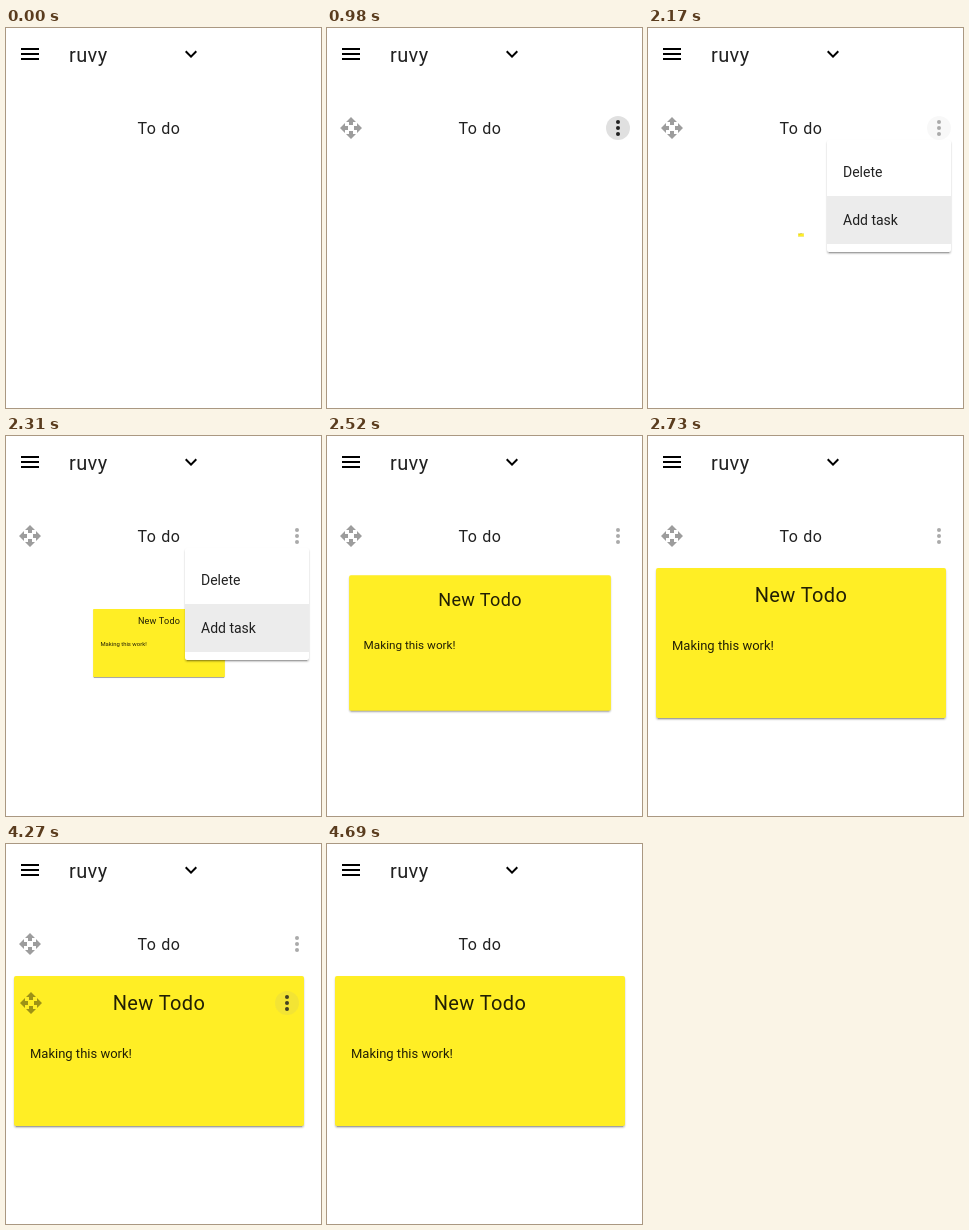
These frames come from a looping animation (315 px wide and 380 px high, 5950 ms). An HTML page:

```html
<!DOCTYPE html>
<html lang="en">
<head>
<meta charset="utf-8">
<title>Task board</title>
<style>
  html, body { margin: 0; width: 100%; height: 100%; overflow: hidden; background: #fff; }
  body { position: relative; font-family: Roboto, Arial, sans-serif; color: rgba(0,0,0,.87); }
  div, svg { position: absolute; }
  svg { width: 24px; height: 24px; }
  .title { font-size: 20px; line-height: 24px; letter-spacing: .02em; white-space: nowrap; }
  .center { left: 0; width: 100%; text-align: center; }
  .button { width: 24px; height: 24px; border-radius: 50%; }
  .raised { box-shadow: 0 2px 2px rgba(0,0,0,.14), 0 3px 1px -2px rgba(0,0,0,.2), 0 1px 2px rgba(0,0,0,.12); border-radius: 2px; }
  #listName { left: 8px; top: 91px; width: 290px; text-align: center; font-size: 16px; line-height: 19px; letter-spacing: .04em; }
  #card { left: 8px; top: 132px; width: 290px; height: 150px; background: #ffee25; }
  #note { left: 16px; top: 70px; font-size: 13px; line-height: 15px; white-space: nowrap; }
  #menu { left: 179px; top: 112px; width: 124px; height: 112px; }
  #sheet, #items { width: 100%; height: 100%; }
  #sheet { background: #fff; transform-origin: 100% 0; }
  .item { width: 108px; height: 32px; padding: 16px 0 0 16px; height: 32px; font-size: 14px; line-height: 16px; }
</style>
</head>
<body>
<svg style="left:12px;top:14px"><path d="M3 18h18v-2H3zM3 13h18v-2H3zM3 6v2h18V6z"/></svg>
<div class="title" style="left:63px;top:15px">ruvy</div>
<svg style="left:173px;top:14px"><path d="M16.59 8.59L12 13.17 7.41 8.59 6 10l6 6 6-6z"/></svg>

<svg id="listMove" style="left:12px;top:88px"><path id="arrows" d="M10 9h4V6h3l-5-5-5 5h3zM9 10H6V7l-5 5 5 5v-3h3zM23 12l-5-5v3h-3v4h3v3zM14 15h-4v3H7l5 5 5-5h-3z"/></svg>
<div id="listName">To do</div>
<div id="listMore" class="button" style="left:279px;top:88px">
  <svg><g id="dots" fill="#222"><circle cx="12" cy="6" r="2"/><circle cx="12" cy="12" r="2"/><circle cx="12" cy="18" r="2"/></g></svg>
</div>

<div id="card" class="raised">
  <svg id="cardMove" style="left:5px;top:15px"><use href="#arrows"/></svg>
  <div class="title center" style="top:15px">New Todo</div>
  <div id="cardMore" class="button" style="left:261px;top:15px"><svg><use href="#dots"/></svg></div>
  <div id="note">Making this work!</div>
</div>

<div id="menu">
  <div id="sheet" class="raised"></div>
  <div id="items">
    <div id="del" class="item" style="top:8px">Delete</div>
    <div id="add" class="item" style="top:56px">Add task</div>
  </div>
</div>

<script>
const LOOP = 5950, STEP = 70, DIM = .38;
const el = {};
document.querySelectorAll('[id]').forEach(e => el[e.id] = e.style);

const ramp = (t, from, to) => Math.min(1, Math.max(0, (t - from) / (to - from)));

// Linear interpolation through [time, value, time, value, ...]
function track(t, ...keys) {
  let v = keys[1];
  for (let i = 2; i < keys.length; i += 2)
    v += (keys[i + 1] - keys[i - 1]) * ramp(t, keys[i - 2], keys[i]);
  return v;
}

// CSS cubic-bezier timing, solved by bisection
function bezier(p, x1, y1, x2, y2) {
  if (p <= 0 || p >= 1) return p;
  const at = (u, a, b) => 3 * u * (1 - u) * (1 - u) * a + 3 * u * u * (1 - u) * b + u ** 3;
  let lo = 0, hi = 1;
  for (let i = 0; i < 24; i++) {
    const mid = (lo + hi) / 2;
    if (at(mid, x1, x2) < p) lo = mid; else hi = mid;
  }
  return at(lo, y1, y2);
}
const ease = p => bezier(p, .25, .1, .25, 1);
const swift = p => bezier(p, .4, 0, .2, 1);

function drawList(t) {
  el.listMove.opacity = track(t, 0, 0, 210, DIM, 4550, DIM, 4690, 0);
  el.listMore.opacity = track(t, 0, 0, 210, DIM, 490, DIM, 700, 1, 1400, 1, 1610, DIM, 4550, DIM, 4690, 0);
  const focus = t < 980 ? 0 : track(t, 2100, .12, 2310, 0);
  el.listMore.background = `rgba(0,0,0,${focus})`;
}

function drawCard(t) {
  el.card.transform = `scale(${ease(ramp(t, 2150, 2740))})`;
  el.cardMove.opacity = track(t, 3080, 0, 3220, DIM, 4550, DIM, 4690, 0);
  el.cardMore.opacity = track(t, 3080, 0, 3220, DIM, 3290, DIM, 3570, 1, 4200, 1, 4480, DIM, 4550, DIM, 4690, 0);
  el.cardMore.background = `rgba(158,158,158,${track(t, 3290, 0, 3570, .2, 4200, .2, 4480, 0)})`;
}

function drawMenu(t) {
  const closing = t > 2310;
  const fade = (from) => closing ? 1 - ease(ramp(t, 2310, 2510)) : ease(ramp(t, from, from + 200));
  const open = swift(closing ? 1 - ramp(t, 2310, 2610) : ramp(t, 1000, 1300));
  el.sheet.transform = `scale(${open})`;
  el.sheet.opacity = fade(1000);
  el.items.clipPath = `inset(0 0 ${100 - 100 * open}% ${100 - 100 * open}%)`;
  el.del.opacity = fade(1017);
  el.add.opacity = fade(1120);
  el.del.background = t >= 1470 && t < 1750 ? '#ececec' : 'none';
  el.add.background = t >= 1750 ? '#ececec' : 'none';
}

function frame(now) {
  const t = Math.floor((now % LOOP) / STEP) * STEP;
  drawList(t);
  drawCard(t);
  drawMenu(t);
  requestAnimationFrame(frame);
}
frame(0);
</script>
</body>
</html>
```
